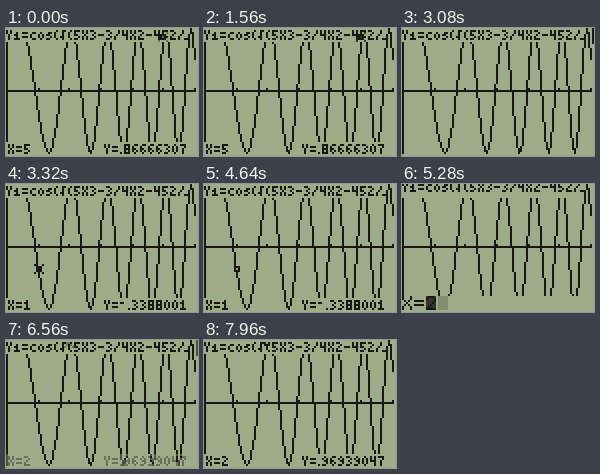
A matplotlib script for the animation above (8 s loop, 192 px wide and 128 px high).

```python
import numpy as np
import matplotlib.pyplot as plt
from matplotlib.animation import FuncAnimation

W, H, STEP, FRAMES, FADE = 96, 64, 40, 200, 5
PAPER = np.array([158, 171, 136]) / 255
INK = np.array([22, 24, 18]) / 255

# Pen strokes: points are "xy", strokes are split by "|".
SMALL = {
    "Y": "00 01 12 14|20 21 12", "X": "00 01 12 23 24|20 21 12 03 04",
    "=": "01 21|03 23", "c": "21 11 02 03 14 24", "o": "11 02 03 14 23 22 11",
    "s": "21 11 02 12 23 14 04", "(": "10 01 03 14", "√": "20 10 14 03",
    "-": "02 22", "~": "01 11", "/": "20 21 12 03 04", ".": "04", "_": "04 14",
    "₁": "02 11 14|04 24",
    "0": "10 01 03 14 23 21 10", "1": "01 10 14|04 24",
    "2": "00 10 21 12 03 04 24", "3": "00 10 21 12 23 14 04",
    "4": "00 02 22|20 24", "5": "20 00 02 12 23 14 04",
    "6": "20 10 01 03 14 23 12 02", "7": "00 20 21 12 14",
    "8": "00 20 24 04 00|02 22", "9": "10 01 12 22|10 21 23 14 04",
}
LARGE = {
    "X": "00 01 23 45 46|40 41 23 05 06", "=": "02 42|04 44",
    "1": "11 20 26|16 36", "2": "01 10 30 41 42 06 46",
}
WIDTHS = {"(": 3, ".": 2}
FORMULA = "Y₁=cos(√(5X3-3/4X2-452/"


def dot(lcd, x, y, on=1):
    if 0 <= x < W and 0 <= y < H:
        lcd[y, x] = on


def line(lcd, x0, y0, x1, y1):
    n = max(abs(x1 - x0), abs(y1 - y0), 1)
    for i in range(n + 1):
        x, y = x0 + (x1 - x0) * i / n, y0 + (y1 - y0) * i / n
        dot(lcd, int(np.floor(x + 0.5)), int(np.floor(y + 0.5)))


def glyph(lcd, strokes, x, y):
    for stroke in strokes.split("|"):
        pts = [(x + int(p[0]), y + int(p[1])) for p in stroke.split()]
        for a, b in zip(pts, pts[1:] or pts):
            line(lcd, *a, *b)


def small(lcd, text, x, y, top, bottom):
    for ch in text:
        w = WIDTHS.get(ch, 4)
        lcd[top:bottom, x:x + w] = 0
        glyph(lcd, SMALL[ch], x, y)
        x += w
    return x


def formula(lcd, y):
    end = small(lcd, FORMULA, 0, y, 0, 7)
    lcd[0:7, end - 1:end + 1] = 0
    glyph(lcd, SMALL["_"], end - 1, y)


def func(x):
    with np.errstate(invalid="ignore"):
        return np.cos(np.sqrt(5 * x**3 - 3 / 4 * x**2 - 452 / 783))


def row(y):
    return int(round(31 - 31 * y))


def graph():
    lcd = np.zeros((H, W))
    lcd[31, :95] = 1
    lcd[:63, 0] = 1
    for k in range(1, 7):
        lcd[30, round(k * 94 / 6)] = 1
    ys = func(np.arange(95) * 6 / 94)
    for x in range(94):
        if not np.isnan(ys[x]):
            line(lcd, x, row(ys[x]), x + 1, row(ys[x + 1]))
    return lcd


def cursor(lcd, cx, cy, on):
    for dx in range(-2, 3):
        for dy in range(-2, 3):
            ring = max(abs(dx), abs(dy)) == 1
            star = abs(dx) == abs(dy) or (ring and dy == 0)
            if (star if on else ring) and cy + dy > 0:
                dot(lcd, cx + dx, cy + dy)
    if not on:
        dot(lcd, cx, cy, 0)


def trace(x, on, values=True, busy=False):
    lcd = graph()
    formula(lcd, 1)
    y = func(float(x))
    if values:
        digits = f"{abs(y):.8f}"[1:] if y > 0 else "~" + f"{abs(y):.7f}"[1:]
        lcd[57:63, 0] = 0
        small(lcd, f"X={x}", 1, 58, 57, 63)
        small(lcd, "Y=" + digits, 49, 58, 57, 63)
        cursor(lcd, round(x * 94 / 6), row(y), on)
    if busy:
        lcd[:8, 95] = 1
    return lcd


def prompt(text, block=True):
    lcd = graph()
    formula(lcd, -1)
    lcd[56:] = 0
    for i, ch in enumerate(text):
        glyph(lcd, LARGE[ch], 6 * i, 56)
    if block:
        x = 6 * len(text)
        lcd[56:63, x:x + 5] = 1
    return lcd


SCENES = [
    (-1000, trace(5, True)), (-80, trace(5, False)), (320, trace(5, True)),
    (760, trace(5, False)), (1160, trace(5, True)), (1560, trace(5, False)),
    (2000, prompt("X=")), (2160, prompt("X=1")), (2600, prompt("X=1", False)),
    (2920, trace(1, True, values=False, busy=True)), (3160, trace(1, True)),
    (3640, trace(1, False)), (4040, trace(1, True)), (4440, trace(1, False)),
    (4880, prompt("")), (5080, prompt("X=")), (5280, prompt("X=2")),
    (5720, prompt("X=2", False)),
    (6120, trace(2, True, values=False)),
    (6320, trace(2, True, values=False, busy=True)), (6520, trace(2, True)),
    (6960, trace(2, False)), (7360, trace(2, True)), (7800, trace(2, False)),
]


def scene(ms):
    return [lcd for start, lcd in SCENES if start <= ms][-1]


def picture(n):
    # The slow display shows the mean of its latest states.
    level = sum(scene((n - k) * STEP) for k in range(FADE)) / FADE
    return PAPER + level[..., None] * (INK - PAPER)


fig = plt.figure(figsize=(1.92, 1.28), dpi=100, facecolor=PAPER)
ax = fig.add_axes([0, 0, 1, 1])
ax.axis("off")
screen = ax.imshow(picture(0), interpolation="nearest", aspect="auto")


def update(n):
    screen.set_data(picture(n))
    return [screen]


anim = FuncAnimation(fig, update, frames=FRAMES, interval=STEP, repeat=True,
                     repeat_delay=0, blit=False)
plt.show()
```
